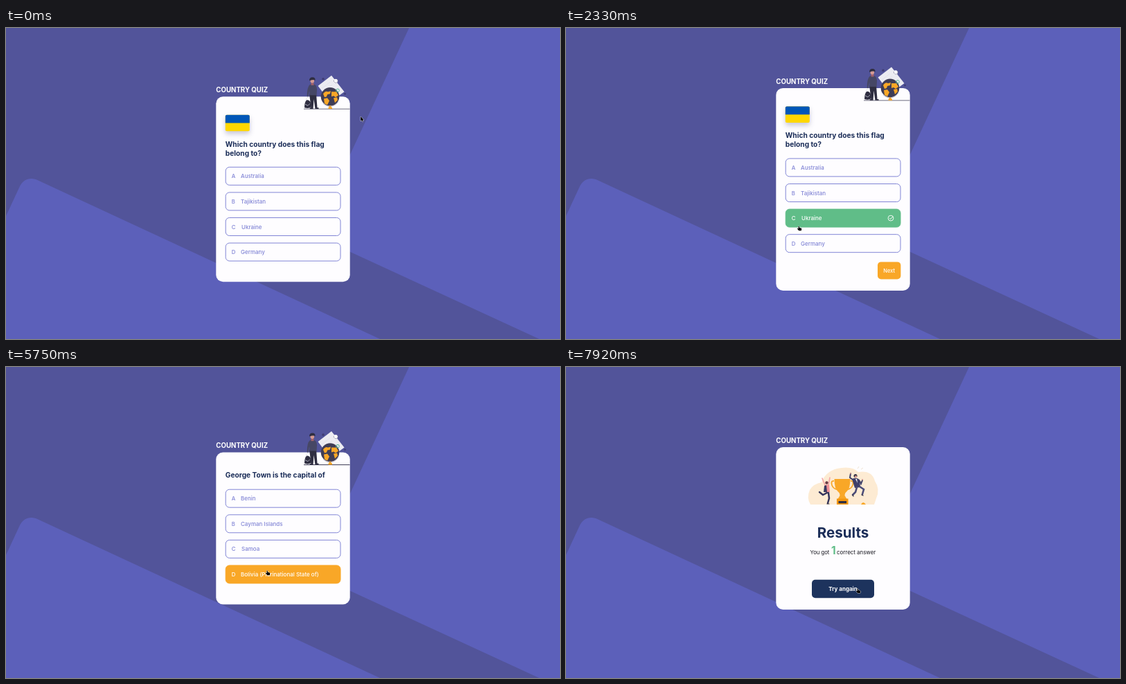
Animation of 800x450 px, one loop 8000 ms. Source, as an HTML page with a canvas:

```html
<!DOCTYPE html>
<html lang="en">
<head>
<meta charset="utf-8">
<title>Country quiz</title>
<style>
html, body { margin: 0; width: 100%; height: 100%; overflow: hidden; background: #52549a; }
canvas { display: block; width: 800px; height: 450px; }
</style>
</head>
<body>
<canvas id="stage"></canvas>
<script>
const canvas = document.getElementById('stage');
const ratio = window.devicePixelRatio || 1;
canvas.width = 800 * ratio;
canvas.height = 450 * ratio;
const ctx = canvas.getContext('2d');

const LOOP = 8000;
const WHITE = '#fefdff', NAVY = '#1b2d58', PURPLE = '#8084d5', ORANGE = '#f9a727',
      GREEN = '#60bd88', RED = '#e97f80', DARK = '#2f2e41', SLATE = '#3f3d56';

const questions = [
  { title: ['Which country does this flag', 'belong to?'], names: ['Australia', 'Tajikistan', 'Ukraine', 'Germany'],
    right: 2, pick: 2, flag: true, top: 99.3, height: 268, titleY: 72.2, listY: 102 },
  { title: ['George Town is the capital of'], names: ['Benin', 'Cayman Islands', 'Samoa', 'Bolivia (Plurinational State of)'],
    right: 1, pick: 3, top: 123.6, height: 219.8, titleY: 36.8, listY: 53.6 }
];

// start time, question index (none: results), answered
const phases = [[0, 0, false], [1540, 0, true], [3250, 1, false], [5910, 1, true], [7330]];

// time, x, y of the pointer
const track = [
  [0, 514, 132], [80, 514, 132], [330, 462, 108], [580, 425, 205], [830, 395, 268],
  [1330, 397, 295], [1580, 397, 295], [1950, 375, 286], [2330, 337, 290], [2420, 337, 290],
  [2670, 380, 318], [3080, 462, 350], [3620, 462, 350], [3900, 430, 265], [4330, 302, 171],
  [4500, 302, 170], [4720, 434, 157], [4950, 305, 162], [5250, 274, 290], [5400, 275, 295],
  [5700, 378, 298], [5950, 378, 298], [6400, 290, 308], [7000, 460, 332], [7400, 460, 332],
  [7720, 422, 324], [LOOP, 422, 324]
];

function pointerAt(t) {
  const i = track.findIndex(p => p[0] > t);
  const a = track[i - 1], b = track[i], k = (t - a[0]) / (b[0] - a[0]);
  return { x: a[1] + (b[1] - a[1]) * k, y: a[2] + (b[2] - a[2]) * k };
}

function box(x, y, w, h, r, fill, stroke) {
  ctx.beginPath();
  ctx.roundRect(x, y, w, h, r);
  if (fill) { ctx.fillStyle = fill; ctx.fill(); }
  if (stroke) { ctx.strokeStyle = stroke; ctx.lineWidth = 1; ctx.stroke(); }
}

function disc(x, y, r, fill) {
  ctx.beginPath();
  ctx.arc(x, y, r, 0, 7);
  ctx.fillStyle = fill;
  ctx.fill();
}

function shape(d, fill) {
  ctx.fillStyle = fill;
  ctx.fill(new Path2D(d));
}

function line(d, stroke, width) {
  ctx.strokeStyle = stroke;
  ctx.lineWidth = width;
  ctx.stroke(new Path2D(d));
}

function text(str, x, y, size, weight, color, align = 'left') {
  ctx.font = `${weight} ${size}px Inter, "Open Sans", sans-serif`;
  ctx.textAlign = align;
  ctx.fillStyle = color;
  ctx.fillText(str, x, y);
}

function at(x, y, draw) {
  ctx.save();
  ctx.translate(x, y);
  draw();
  ctx.restore();
}

function background() {
  ctx.fillStyle = '#52549a';
  ctx.fillRect(0, 0, 800, 450);
  shape('M582 0 443 299 770 450H800V0Z', '#5c60ba');
  ctx.beginPath();
  ctx.moveTo(0, 272);
  ctx.arcTo(27.9, 212, 540, 450, 18);
  ctx.lineTo(540, 450);
  ctx.lineTo(0, 450);
  ctx.fill();
}

// traveller beside a globe; origin at the card's top
function traveller() {
  shape('M450.5-15.5 470-30.500 488.500-7 468 8Z', '#ececf2');
  line('M456-12 468-21M459-8 471-17', '#dcdce6', .6);
  disc(476, -22.500, 3.100, '#fff');
  line('M473.500-24a3 3 0 1 0 5-1', '#6c6a8c', .6);
  disc(458, -25.500, 1.800, '#3f3d73');
  disc(489.500, -4, 1.400, '#3f3d73');
  shape('M430 17.500H496.500V18.300H430Z', SLATE);

  disc(468, 0, 13.300, SLATE);
  shape('M458-4q3-5 7-3l4-1-1 4-4 1-1 3-3 1zM459 3l5-1 3 4-3 6-4-2zM470-7l7 0 3 5-4 3-3-2-3 1zM473 2l5-1 1 4-4 4z', ORANGE);
  shape('M466.500 13h3v2l1.500 1v1.800h-5.500v-1.800l1-1z', ORANGE);
  line('M458 10a14 14 0 0 0 22-3', '#8a88a0', .5);
  ctx.beginPath();
  ctx.arc(479, -9, 2.300, 0, 7);
  ctx.strokeStyle = '#57b894';
  ctx.lineWidth = 1;
  ctx.stroke();

  shape('M438-4h10l1.500 20h2v1.800h-5l-2-14-1 14h-4.800v-1.500l1.800-.5z', DARK);
  shape('M438.500-17q4-2.500 8 0 2.500 2 2.500 7l-.5 8h-10l-.5-7-1.500 9h-1.800q0-14 3.800-17z', '#464765');
  shape('M440.500-20h4v3.500h-4z', '#a0616a');
  disc(442.300, -22.500, 2.800, '#d59a92');
  shape('M438-23q0-5 4.500-5 4.500 0 4 4.500-2-2-8.500.5z', DARK);
  shape('M434 5q4-1 6 4l1 6q-4 3-10 1 0-8 3-11z', DARK);
  line('M433 6q1-6 4-5M432 11l4 2 3-3', '#d7d7e2', .7);
}

// two winners and a cup, in stage coordinates
function winners() {
  shape('M353 199q-6-10-1-21 5-9 17-11 7-19 29-21 16-2 24 6 20-3 24 13 8 12 2 25l-3 9z', '#fdebd3');
  line('M421 147l2-3M426 148l3-2', '#ead9c0', .7);
  line('M387 165q-5-1-3 6 2 5 7 6M411 165q5-1 3 6-2 5-7 6', ORANGE, 1.800);
  shape('M387.500 162h23q0 14-5 18-3 2-3 6l3 5h-13l3-5q0-4-3-6-5-4-5-18z', ORANGE);
  box(391, 190.500, 16.500, 8.500, 0, '#f3960f');
  box(393.500, 194, 11.500, 3.200, 0, DARK);

  ctx.lineCap = 'round';
  line('M374 171l-4-10M379 171l2-11', '#f4a6a5', 1.600);
  disc(376.500, 167.500, 2.200, '#6b3c46');
  shape('M373 171l7-1 1 11-6 1z', '#ef8f96');
  shape('M373 172l3-1 1 10-5 0z', '#39395f');
  line('M377 182l-6 3-5-4M379 182l1 8-2 7', '#34345b', 2.500);
  line('M377 198h3', DARK, 1.200);

  line('M414 163l-4-3 1-6M424 165l2 4 2-5', '#3f4069', 2);
  disc(410.800, 154, 1, '#d59a92');
  disc(428, 163, 1, '#d59a92');
  disc(418, 157.500, 2.500, DARK);
  disc(418.500, 158.800, 1.700, '#d59a92');
  shape('M413 162q6-3 11 1l1 11-8 1z', '#3f4069');
  shape('M418 162l2 0 1 6z', '#fff');
  line('M420 174l-2 7-4 4M424 173l6 4-2 7', '#4b4c78', 2.600);
  line('M414 185l1 2M427 185l2 1', DARK, 1.300);
  ctx.lineCap = 'butt';
  shape('M426 199q3-6 7 0z', ORANGE);
}

function flag(top) {
  ctx.save();
  ctx.shadowColor = 'rgba(60,60,120,.28)';
  ctx.shadowBlur = 7 * ratio;
  ctx.shadowOffsetY = 4 * ratio;
  box(316.800, top, 35, 23.500, 2, '#ffd700');
  ctx.restore();
  box(316.800, top, 35, 11.800, [2, 2, 0, 0], '#0057b8');
}

function mark(y, ok) {
  ctx.beginPath();
  ctx.arc(469, y, 3.900, 0, 7);
  ctx.strokeStyle = '#fff';
  ctx.lineWidth = .9;
  ctx.stroke();
  at(469, y, () => line(ok ? 'M-1.800 0-.4 1.500 2.800-2' : 'M-1.400-1.400 1.400 1.400M1.400-1.400-1.400 1.400', '#fff', 1));
}

function card(top, height) {
  box(303.300, top, 193.400, height, 10, WHITE);
  text('COUNTRY QUIZ', 303.300, top - 6.200, 9.700, 700, '#fff');
}

// both screens return whether the pointer is over something clickable
function quiz(q, answered, p) {
  const top = q.top - (answered ? 12.400 : 0);
  const height = q.height + (answered ? 25 : 0);
  const over = (x, y, w, h) => p.x > x && p.x < x + w && p.y - 3 > y && p.y - 3 < y + h;
  let hot = false;
  card(top, height);
  at(0, top, traveller);
  if (q.flag) flag(top + 26.500);
  q.title.forEach((s, i) => text(s, 316.800, top + q.titleY + i * 13.200, 10.200, 700, NAVY));

  q.names.forEach((name, i) => {
    const y = top + q.listY + i * 36.600;
    const hover = over(317, y, 166, 26);
    hot = hot || hover;
    let fill = null;
    if (answered) fill = i === q.right ? GREEN : i === q.pick ? RED : null;
    else if (hover) fill = ORANGE;
    box(317.200, y, 165.800, 26, 5.500, fill, fill || PURPLE);
    const color = fill ? '#fff' : PURPLE;
    text('ABCD'[i], 325.800, y + 16, 7.800, 500, color);
    text(name, i === 2 ? 340 : 339, y + 16, 8, 500, color);
    if (answered && fill) mark(y + 13, i === q.right);
  });

  if (answered) {
    const y = top + height - 41.500;
    box(450, y, 33.400, 25, 5, ORANGE);
    text('Next', 466.700, y + 15.300, 7.500, 500, '#fff', 'center');
    hot = hot || over(450, y, 33.400, 25);
  }
  return hot;
}

function results(p) {
  card(116, 235);
  winners();
  text('Results', 400, 246.800, 20.600, 700, NAVY, 'center');
  text('You got', 352.500, 271.300, 7.700, 400, '#15151d');
  text('1', 386.300, 271.300, 15.500, 700, GREEN, 'center');
  text('correct answer', 391, 271.300, 7.900, 400, '#15151d');
  box(355, 307.700, 90, 26.500, 5, '#1d335d');
  text('Try angain', 400, 324, 8, 700, '#fff', 'center');
  return p.x > 355 && p.x < 445 && p.y > 310 && p.y < 337;
}

function pointer(p, hand) {
  const d = hand
    ? 'M-1.500-3.200q.9-.6 1.200.4l.4 1.800 2.300.5q1 .4.800 1.500l-.4 2.200H-.8l-2.200-2.600q-.2-1 .8-.8l1 .5z'
    : 'M-1.800-4V2.600L-.3 1.300 .7 3.500 1.800 3 .9.900H2.700Z';
  at(p.x, p.y, () => {
    line(d, '#fff', .8);
    shape(d, '#000');
  });
}

function frame(now) {
  const t = now % LOOP;
  const p = pointerAt(t);
  const [, index, answered] = phases.filter(f => f[0] <= t).pop();
  ctx.setTransform(ratio, 0, 0, ratio, 0, 0);
  background();
  const hot = index === undefined ? results(p) : quiz(questions[index], answered, p);
  pointer(p, hot);
  requestAnimationFrame(frame);
}
requestAnimationFrame(frame);
</script>
</body>
</html>
```
